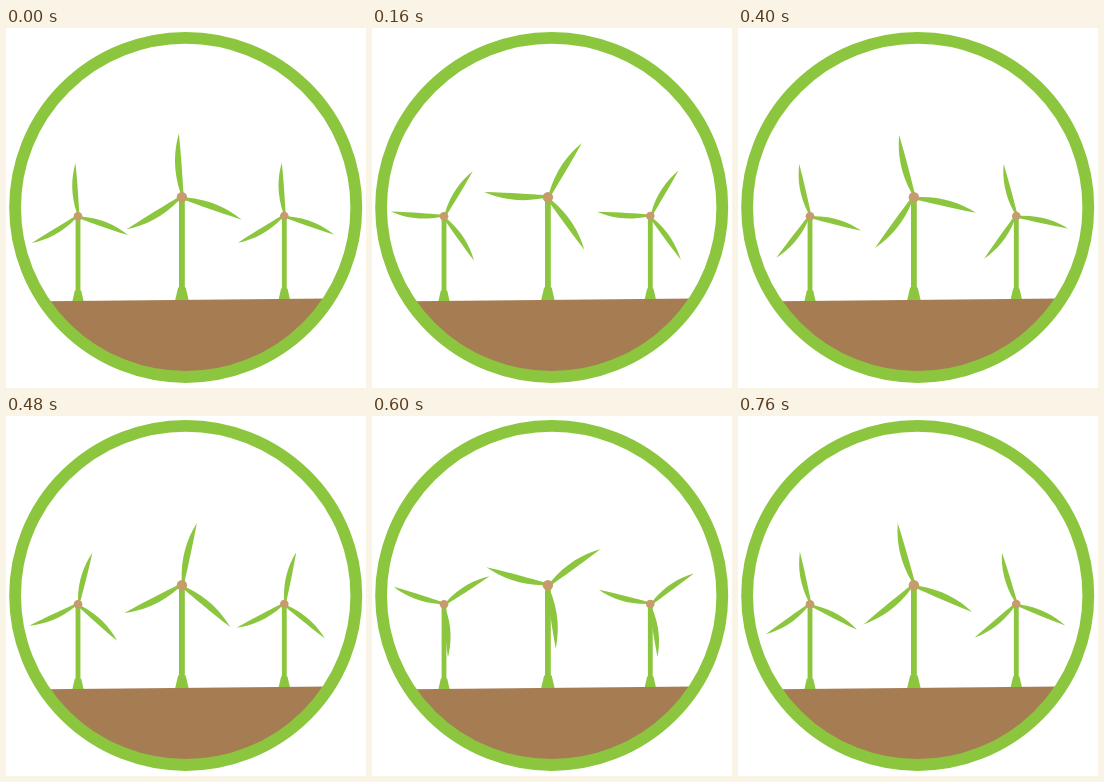
An HTML page for the animation above (0.8 s loop, 360 px wide and 360 px high).

```html
<!DOCTYPE html>
<html lang="en">
<head>
<meta charset="utf-8">
<title>Wind turbines</title>
<style>
  html, body { margin: 0; width: 100%; height: 100%; overflow: hidden; background: #fff; }
  svg { display: block; width: 100vw; height: 100vh; }
</style>
</head>
<body>
<svg viewBox="0 0 360 360">
  <defs>
    <path id="blade" d="M0-64C-6-46-7.5-27-1.2-4H1.8C1.5-18 1.5-36 0-64Z"/>
    <g id="rotor">
      <use href="#blade"/>
      <use href="#blade" transform="rotate(113.3)"/>
      <use href="#blade" transform="rotate(242.6)"/>
    </g>
  </defs>
  <path d="M40 273.3L322 270.4A168 168 0 0 1 40 273.3Z" fill="#a67c52"/>
  <ellipse cx="179.7" cy="179.4" rx="170.6" ry="169.6" fill="none" stroke="#8cc63f" stroke-width="11.8"/>
  <g id="farm" fill="#8cc63f"></g>
</svg>
<script>
const LOOP = 800, STEP = 40, START = -2.7;

// Hub position, size, ground height and degrees swept in one loop
const turbines = [
  { x: 72, y: 188.3, scale: 0.835, ground: 273, sweep: 254 },
  { x: 175.9, y: 169.2, scale: 1, ground: 272, sweep: 250 },
  { x: 278.3, y: 188, scale: 0.835, ground: 271, sweep: 249 }
];

function turbineMarkup({ x, y, scale, ground }) {
  const half = 2.9 * scale, shoulder = 3.8 * scale, foot = 6.7 * scale;
  const flare = ground - 12.5 * scale;
  return `<path d="M${x - half} ${y}H${x + half}V${flare}H${x + shoulder}L${x + foot} ${ground}
      H${x - foot}L${x - shoulder} ${flare}H${x - half}Z"/>
    <use class="rotor" href="#rotor"/>
    <circle cx="${x}" cy="${y}" r="${5.2 * scale}" fill="#c69c6d"/>`;
}

document.getElementById('farm').innerHTML = turbines.map(turbineMarkup).join('');
const rotors = document.querySelectorAll('.rotor');

function draw() {
  const time = Math.floor(performance.now() % LOOP / STEP) * STEP;
  const eased = (time / LOOP) ** 1.227; // gentle speed-up through the loop
  turbines.forEach(({ x, y, scale, sweep }, i) => {
    rotors[i].setAttribute('transform',
      `translate(${x} ${y}) rotate(${START + sweep * eased}) scale(${scale})`);
  });
  requestAnimationFrame(draw);
}
draw();
</script>
</body>
</html>
```
